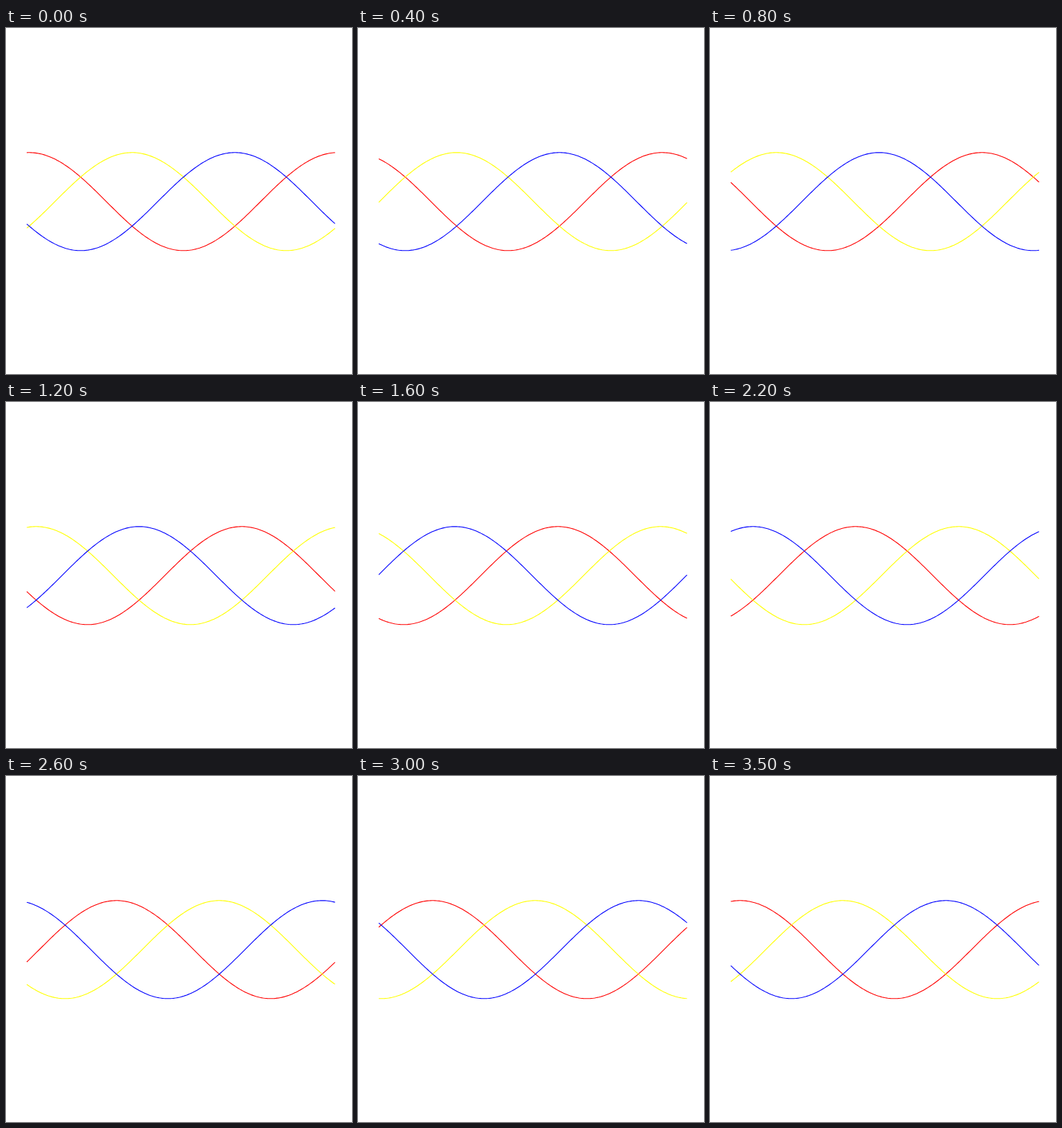
Write an HTML page that moves like this. It is 480 px wide and 480 px high and loops after 3600 ms.

```html
<!DOCTYPE html>
<html lang="en">
<head>
<meta charset="utf-8">
<title>Three-phase waves</title>
<style>
  html, body { margin: 0; width: 100%; height: 100%; overflow: hidden; background: #fff; }
  svg { display: block; width: 100vw; height: 100vh; }
  path { fill: none; stroke-width: 1.1; }
</style>
</head>
<body>
<svg viewBox="0 0 480 480">
  <path id="red" stroke="#f00"/>
  <path id="yellow" stroke="#ff0"/>
  <path id="blue" stroke="#00f"/>
</svg>
<script>
const LOOP = 3600, STEP = 100;
const LEFT = 28.8, RIGHT = 456.4, PERIOD = 428;
const MIDDLE = 240.8, AMPLITUDE = 68;
const CREST = 32.2; // crest of the red wave at the start

// Step index and phase in degrees: a slower start, then an almost even drift.
const PHASES = [[0, 0], [6, 48], [8, 69.8], [16, 153.9], [22, 217],
                [26, 258.2], [30, 300], [35, 352], [36, 360]];

const waves = ['red', 'yellow', 'blue'].map((id, i) => ({
  path: document.getElementById(id),
  offset: i * PERIOD / 3
}));

function phaseAt(step) {
  const next = PHASES.findIndex(([s]) => s > step);
  const [s0, p0] = PHASES[next - 1], [s1, p1] = PHASES[next];
  return p0 + (p1 - p0) * (step - s0) / (s1 - s0);
}

function wavePath(crest) {
  const points = [];
  const count = 214;
  for (let i = 0; i <= count; i++) {
    const x = LEFT + (RIGHT - LEFT) * i / count;
    const y = MIDDLE - AMPLITUDE * Math.cos((x - crest) / PERIOD * 2 * Math.PI);
    points.push(x.toFixed(2) + ' ' + y.toFixed(2));
  }
  return 'M' + points.join('L');
}

function draw(ms) {
  const step = Math.floor((ms % LOOP) / STEP);
  const shift = phaseAt(step) / 360 * PERIOD;
  for (const { path, offset } of waves) {
    path.setAttribute('d', wavePath(CREST + offset - shift));
  }
}

let start;
function tick(now) {
  start ??= now;
  draw(Math.max(0, now - start));
  requestAnimationFrame(tick);
}
draw(0);
requestAnimationFrame(tick);
</script>
</body>
</html>
```
